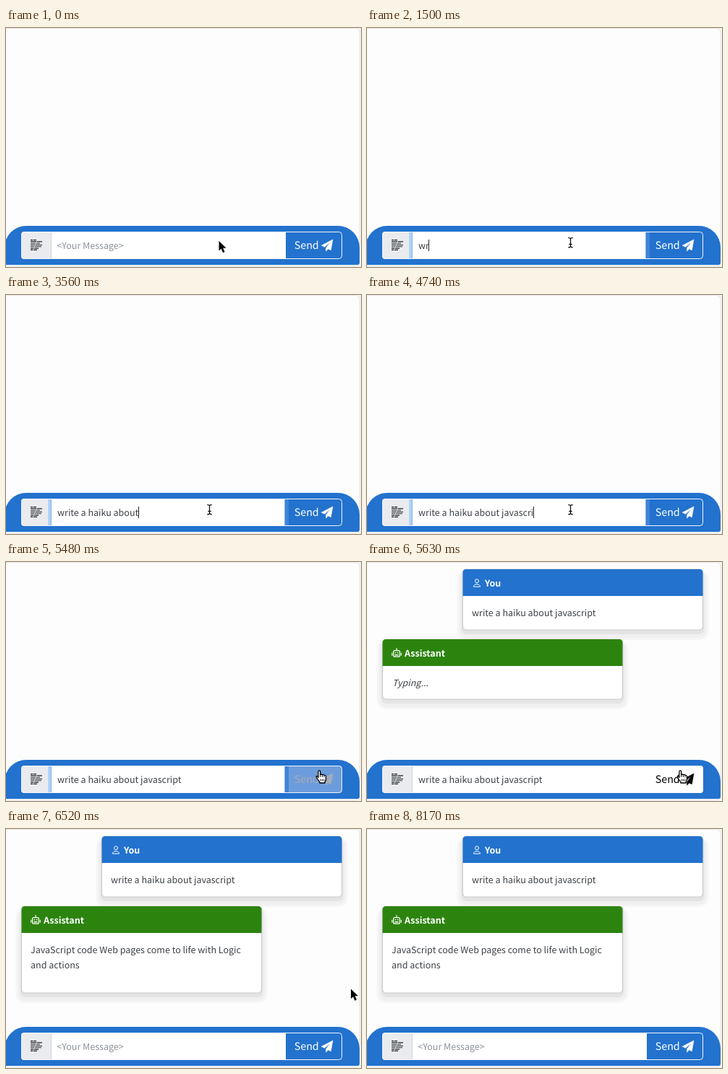
An HTML page that plays this animation: 491x331 px, repeating every 9510 ms.

```html
<!DOCTYPE html>
<html lang="en">
<head>
<meta charset="utf-8">
<title>Chat demo</title>
<style>
html, body { margin: 0; width: 100%; height: 100%; overflow: hidden; background: #f3f3f3; }
svg { display: block; width: 491px; height: 331px; }
text {
  font: 12.5px "Noto Sans CJK JP", "Noto Sans CJK SC", "Noto Sans CJK KR", "Noto Sans CJK TC", "Noto Sans", sans-serif;
  text-rendering: geometricPrecision;
  fill: #3c4146;
}
.head { font-weight: 700; fill: #fff; }
.typing { font-style: italic; }
.hint { fill: #8d9399; }
.send { font-size: 14.3px; fill: inherit; }
.line { fill: none; stroke: #fff; stroke-linecap: round; stroke-linejoin: round; }
</style>
</head>
<body>
<svg viewBox="0 0 491 331">
  <defs>
    <clipPath id="row"><rect x="21" y="282" width="444" height="38" rx="4"/></clipPath>
  </defs>
  <rect x="-10" y="0.5" width="499" height="329" rx="6" fill="#fdfdfd" stroke="#e6e6e6"/>

  <g id="chat">
    <g id="you"></g>
    <g id="bot"></g>
    <g class="line" stroke-width="1">
      <circle cx="152" cy="26.3" r="2.5"/>
      <path d="M147.5 33.8C147.5 29.6 156.5 29.6 156.5 33.8Z"/>
    </g>
    <text class="head" x="163" y="33.5">You</text>
    <text x="145" y="75.3">write a haiku about javascript</text>
    <g class="line" stroke-width="1.2">
      <path d="M41 119.6V122.4M34.7 126V129.2M47.3 126V129.2"/>
      <rect x="36.6" y="122.6" width="8.8" height="8.6" rx="2"/>
      <path d="M39.2 125.8h.4M42.4 125.8h.4M39 128.8H43" stroke-width="1.5"/>
    </g>
    <text class="head" x="52" y="130.5">Assistant</text>
    <text class="typing" id="typing" x="35" y="172.3">Typing...</text>
    <g id="reply">
      <text x="34" y="172.3">JavaScript code Web pages come to life with Logic</text>
      <text x="34" y="193.3">and actions</text>
    </g>
  </g>

  <path d="M-2 328V304A30 30 0 0 1 28 274H459A30 30 0 0 1 489 304V325Q489 328 486 328Z" fill="#2272ce"/>
  <g clip-path="url(#row)">
    <rect x="21" y="282" width="42" height="38" fill="#e9ebee"/>
    <rect x="62" y="282" width="1" height="38" fill="#ced4da"/>
    <rect x="63" y="282" width="323" height="38" fill="#fff"/>
    <rect id="sendBg" x="386" y="282" width="79" height="38"/>
    <g id="ring">
      <rect x="60.25" y="280" width="328.5" height="42" fill="none" stroke="#aed0f8" stroke-width="4"/>
      <rect x="386" y="282" width="5" height="38" fill="#3f83d8"/>
      <rect x="62.5" y="282.5" width="323" height="37" fill="none" stroke="#86b7f0"/>
    </g>
  </g>
  <rect x="21.5" y="282.5" width="443" height="37" rx="4" fill="none" stroke="#f2f6fb"/>
  <path d="M386.5 283V319" stroke="#fff" id="split"/>
  <path id="icon" fill="none" stroke="#25282b" stroke-width="1.1"/>
  <text id="input" x="71" y="305.7"></text>
  <rect id="caret" y="293" width="1" height="16" fill="#222"/>
  <g id="send">
    <text class="send" x="398.7" y="306.3">Send</text>
    <path d="M452 293L436.2 301.2L440.6 303.3L449.2 296L442.6 304.6V309.2L445.4 305.9L449.3 307.7Z" stroke-width=".6" stroke-linejoin="round"/>
  </g>

  <g id="arrow">
    <path d="M0 0V13.6L3.1 10.7L5.5 16.2L8 15.1L5.7 9.8H10Z" fill="#000" stroke="#fff" stroke-width="1.2" paint-order="stroke"/>
  </g>
  <g id="beam" fill="none" stroke-linecap="round">
    <path id="stem" d="M-2.8 -6.4Q0 -6.4 0 -4.6Q0 -6.4 2.8 -6.4M0 -4.6V5M-2.8 6.8Q0 6.8 0 5Q0 6.8 2.8 6.8M-1.6 2.5H1.6" stroke="#111" stroke-width="1.3"/>
  </g>
  <g id="hand">
    <path d="M-3.6 1.5V-6.6Q-3.6 -8.2 -2.2 -8.2Q-.8 -8.2 -.8 -6.6V-2.4Q.6 -3.6 1.9 -2.2Q3.4 -3.2 4.5 -1.6Q7 -2.2 7 .5V3.6Q7 5.6 5.6 7.4V9H-1.6V7.6Q-3.4 5.4 -5 3Q-7 .6 -6.2 -.3Q-5 -1.2 -3.6 1.5Z" fill="#fff" stroke="#000" stroke-width="1.3" stroke-linejoin="round"/>
    <path d="M-.8 -2.4V1M1.9 -2V1M4.5 -1.4V1.2M-.2 3.6V6.4M2 3.6V6.4M4.2 3.6V6.4" stroke="#000" stroke-width=".9"/>
  </g>
</svg>
<script>
const LOOP = 9510;
const PROMPT = "write a haiku about javascript";
const $ = id => document.getElementById(id);
const show = (id, on) => $(id).setAttribute("display", on ? "inline" : "none");

// Each list holds [start time, value...]
const typed = [
  [0, 0], [1050, 1], [1500, 2], [1640, 3], [1790, 4], [1930, 5], [2080, 7],
  [2380, 9], [2530, 11], [2670, 12], [2820, 13], [2970, 15], [3110, 16],
  [3410, 18], [3560, 19], [3700, 21], [3850, 22], [4000, 23], [4150, 24],
  [4290, 25], [4440, 26], [4590, 27], [4730, 28], [4880, 30], [6220, 0]
];
const pointer = [
  [0, "arrow", 294.5, 295], [450, "beam", 281.5, 297], [5180, "beam", 350, 297],
  [5330, "hand", 435.5, 297], [6370, "arrow", 478, 264], [6520, "arrow", 477, 221.5],
  [7720, "arrow", 479, 224], [7870, "arrow", 483, 232], [8020, "arrow", 487, 242],
  [8170, "none", 0, 0]
];
const focus = [[0, 0], [600, 0.5], [750, 1], [5630, 0]];
const button = [[0, "idle"], [5330, "hover"], [5480, "off"], [5630, "hover"], [6370, "idle"]];
const looks = {
  idle: ["#2272ce", "#fff"],
  hover: ["#fff", "#000"],
  off: ["#6d9cdc", "#a5adb8"]
};

function at(list, t) {
  let hit = list[0];
  for (const item of list) if (item[0] <= t) hit = item;
  return hit;
}

function box(x, y, w, h, r, fill) {
  return `<rect x="${x}" y="${y}" width="${w}" height="${h}" rx="${r}" fill="${fill}"/>`;
}

function card(x, y, h, color) {
  const w = 332;
  return box(x - 8, y + 2, w + 16, h + 12, 13, "#f6f6f6") +
    box(x - 5, y + 3, w + 10, h + 8, 10, "#f0f0f0") +
    box(x - 2, y + 3, w + 4, h + 3, 7, "#e4e4e4") +
    box(x - 0.5, y - 0.5, w + 1, h + 1, 5, "#c9cbcd") +
    box(x + 0.5, y + 0.5, w - 1, h - 1, 4.5, "#fff") +
    `<path d="M${x} ${y + 37}v-32q0 -5 5 -5h${w - 10}q5 0 5 5v32z" fill="${color}"/>`;
}

$("you").innerHTML = card(132.5, 10, 84, "#2272ce");

const rows = [[34, 42], [34, 50], [34, 47], [34, 50], [34, 49], [34, 45], [34, 43]];
$("icon").setAttribute("d", rows.map(([a, b], i) => {
  const y = 293.6 + i * 2.3, gap = 37 + (i * 5) % 6;
  return `M${a} ${y}H${gap}M${gap + 0.7} ${y}H${b}`;
}).join(""));

let botHeight = 0;

function draw(t) {
  const count = at(typed, t)[1];
  const glow = at(focus, t)[1];
  const answered = t >= 6220;

  const input = $("input");
  input.textContent = count ? PROMPT.slice(0, count) : "<Your Message>";
  input.setAttribute("class", count ? "" : "hint");
  input.setAttribute("x", count ? 71 : 70.3);
  const end = count ? input.getComputedTextLength() : 0;
  $("caret").setAttribute("x", Math.round(70.5 + end));
  show("caret", glow && t < 5180);
  $("ring").setAttribute("opacity", glow);

  const state = at(button, t)[1];
  const [bg, ink] = looks[state];
  $("sendBg").setAttribute("fill", bg);
  $("send").setAttribute("fill", ink);
  $("send").setAttribute("stroke", ink);
  $("send").firstElementChild.setAttribute("stroke", "none");
  show("split", state === "idle" && !glow);

  show("chat", t >= 5630);
  show("typing", !answered);
  show("reply", answered);
  const h = answered ? 120 : 83;
  if (h !== botHeight) {
    botHeight = h;
    $("bot").innerHTML = card(21.5, 107, h, "#2c840f");
  }

  const [, kind, x, y] = at(pointer, t);
  for (const id of ["arrow", "beam", "hand"]) {
    show(id, id === kind);
    $(id).setAttribute("transform", `translate(${x} ${y})`);
  }
}

const start = performance.now();
function tick() {
  draw((performance.now() - start) % LOOP);
  requestAnimationFrame(tick);
}
tick();
</script>
</body>
</html>
```
